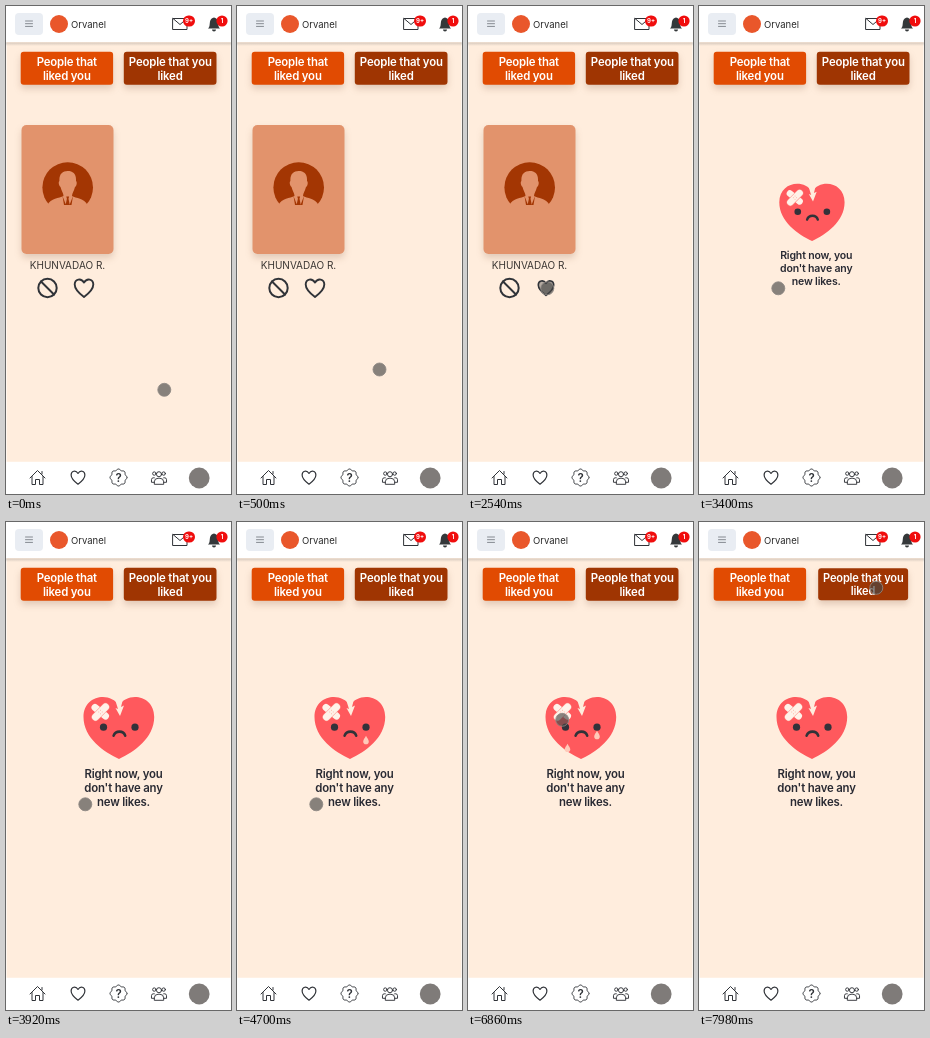
An HTML page for the animation above (8 s loop, 225 by 488 pixels).

```html
<!DOCTYPE html>
<html lang="en">
<head>
<meta charset="utf-8">
<title>Likes</title>
<style>
  html, body { margin: 0; width: 100%; height: 100%; overflow: hidden; background: #fff; }
  svg { display: block; width: 100%; height: 100%; }
  text { font-family: Inter, Roboto, sans-serif; text-anchor: middle; }
  .label, .message { font-size: 11.4px; font-weight: 600; letter-spacing: -.17px; fill: #fff; }
  .message { fill: #292a33; }
  .badge { font-size: 6px; font-weight: 700; fill: #fff; }
  .icon { fill: none; stroke: #303338; stroke-linejoin: round; stroke-linecap: round; }
  .shadow { filter: drop-shadow(0 4px 3.5px rgba(90, 40, 10, .18)); }
</style>
</head>
<body>
<svg viewBox="0 0 225 488" preserveAspectRatio="none">
  <defs>
    <path id="heart" d="M0 9C-4 6-9.3 1.5-9.3-3.5C-9.3-9-3-10.5 0-5.5C3-10.5 9.3-9 9.3-3.5C9.3 1.5 4 6 0 9Z"/>
    <path id="tear" d="M0-4.4C1.2-2 2.8-.4 2.8 1.2A2.8 2.8 0 0 1-2.8 1.2C-2.8-.4-1.2-2 0-4.4Z" fill="#ffc9b9"/>
    <linearGradient id="edge" x2="0" y2="1">
      <stop stop-color="#8a8581" stop-opacity=".35"/>
      <stop offset="1" stop-color="#8a8581" stop-opacity="0"/>
    </linearGradient>
    <clipPath id="portrait"><path d="M36 155H88V199H36Z"/></clipPath>
  </defs>

  <rect x=".5" y="36" width="224" height="420" fill="#ffeddd"/>
  <rect y="36.5" width="225" height="3.5" fill="url(#edge)"/>

  <!-- Header -->
  <rect x="9" y="7" width="28" height="22" rx="4" fill="#e9edf3"/>
  <path class="icon" d="M19.5 15h7M19.5 17.7h7M19.5 20.4h7" style="stroke:#858a91"/>
  <circle cx="53" cy="18" r="9" fill="#e9572b"/>
  <text x="82.5" y="21.5" font-size="9.5" fill="#2b2b2b">Orvanel</text>
  <path class="icon" d="M167 12.5h14v11h-14zl7 6 7-6"/>
  <rect x="177" y="9.5" width="12" height="11" rx="5.5" fill="#f00d0d"/>
  <text class="badge" x="183" y="17.2">9+</text>
  <path d="M202 22.5C204 21 203.5 18 204 15.5C204.5 13 206 12.2 208 11.5C210 12.2 211.5 13 212 15.5C212.5 18 212 21 214 22.5ZM206 23.5h4a2 2 0 0 1-4 0Z" fill="#34383a"/>
  <circle cx="216" cy="15" r="5.6" fill="#f00d0d"/>
  <text class="badge" x="216" y="17.2">1</text>

  <!-- Tabs -->
  <g class="shadow">
    <rect x="14.7" y="45.7" width="92.4" height="33" rx="3" fill="#e14b02"/>
    <text class="label" x="60.8" y="59.5">People that</text>
    <text class="label" x="60.8" y="73.5">liked you</text>
  </g>
  <g id="secondTab" class="shadow">
    <rect x="117.8" y="45.7" width="92.7" height="33" rx="3" fill="#9f3502"/>
    <text class="label" x="164.3" y="59.5">People that you</text>
    <text class="label" x="164" y="73.5">liked</text>
  </g>

  <!-- Profile card -->
  <g id="card">
    <rect class="shadow" x="15.5" y="119" width="92" height="129" rx="5" fill="#e2936c"/>
    <g clip-path="url(#portrait)">
      <circle cx="61.7" cy="181.5" r="25.3" fill="#a33603"/>
      <path d="M61.7 165C67 165 70.5 168 70 175C71.5 176 70.5 180 69 181C68 185 66 187.5 66 190C70 192.5 79 192 82 200H41C44 192 53 192.5 57.5 190C57.5 187.5 55.5 185 54.5 181C53 180 52 176 53.4 175C53 168 56.5 165 61.7 165Z" fill="#e2936c"/>
      <path d="M56.5 190L60 199H58ZM67 190L63.5 199H65.5ZM60.3 190.5h2.8l-.6 2.3 1.3 6.2h-4.2l1.3-6.2Z" fill="#a33603"/>
    </g>
    <text x="61.5" y="263" font-size="10" fill="#3a3532">KHUNVADAO R.</text>
    <g class="icon" stroke-width="2">
      <circle cx="41.5" cy="282" r="9.2"/>
      <path d="M35 275.5L48 288.5"/>
    </g>
    <g id="like" class="icon" stroke-width="1.9"><use href="#heart"/></g>
  </g>

  <!-- Empty state -->
  <g id="empty">
    <path d="M113 237C98 230 77.5 216 77.5 195C77.5 173 104 169 113 183.5C122 169 148.2 173 148.2 195C148.2 216 128 230 113 237Z" fill="#ff595d"/>
    <path d="M109.5 179L112 187L109.5 186L114 194L118 183.5L115 185L116.5 179Z" fill="#ffeddd"/>
    <g fill="none" stroke-width="7" stroke-linecap="round" stroke="#fff2e9">
      <path d="M89 185.5L99.5 194"/>
      <path d="M99.5 185L89.5 195" stroke="#ff8b83" stroke-width="8"/>
      <path d="M99.5 185L89.5 195"/>
    </g>
    <path d="M92.7 190h.1M96.2 190h.1M94.5 188.3h.1M94.5 191.8h.1" class="icon" style="stroke:#ffb4a4"/>
    <g fill="#33323a">
      <circle cx="97.5" cy="205.2" r="3.6"/>
      <circle cx="129" cy="205.2" r="3.6"/>
    </g>
    <path class="icon" stroke-width="2.6" d="M107.6 213.7C109.5 208.2 117.5 208.2 119.2 213.7"/>
    <use id="leftTear" href="#tear"/>
    <use id="rightTear" href="#tear"/>
    <text class="message" x="117.5" y="256.2">Right now, you</text>
    <text class="message" x="117.5" y="270.2">don't have any</text>
    <text class="message" x="117.5" y="284.2">new likes.</text>
  </g>

  <!-- Bottom navigation -->
  <rect y="455.8" width="225" height="32.2" fill="#fff"/>
  <g class="icon" stroke-width="1">
    <path d="M24 472L31.5 464.5L39 472M26 470.5V478.5H29.5V473.5H33.5V478.5H37V470.5M36 468V465.5"/>
    <use href="#heart" transform="translate(72 471.5) scale(.74)" stroke-width="1.6"/>
    <path id="seal"/>
    <g transform="translate(153 471.8) scale(.94)">
      <circle cy="-3.8" r="2.7"/>
      <path d="M-5 6.5v-2.2a4 4 0 0 1 4-3.8h2a4 4 0 0 1 4 3.8v2.2Z"/>
      <circle cx="-5" cy="-4.5" r="1.8"/>
      <circle cx="5" cy="-4.5" r="1.8"/>
      <path d="M-5 0h-1.2a2 2 0 0 0-1.8 2v2.8h3M5 0h1.2a2 2 0 0 1 1.8 2v2.8h-3"/>
    </g>
  </g>
  <text x="112.5" y="475.6" font-size="11.5" font-weight="600" fill="#303338">?</text>
  <circle cx="193.2" cy="472" r="10.4" fill="#7f7b79"/>

  <circle id="pointer" r="6.5" fill="#464646" fill-opacity=".65" stroke="#8f8984" stroke-opacity=".85"/>
</svg>
<script>
  const LOOP = 8000, TEAR_PERIOD = 2300, TEAR_FALL = 700, EMPTY_START = 3140;
  const el = id => document.getElementById(id);
  const progress = (t, start, end) => Math.min(1, Math.max(0, (t - start) / (end - start)));
  const smooth = u => u * u * (3 - 2 * u);
  const move = (id, x, y) => el(id).setAttribute('transform', `translate(${x} ${y})`);
  const scaleAt = (id, x, y, s) =>
    el(id).setAttribute('transform', `translate(${x} ${y}) scale(${s}) translate(${-x} ${-y})`);
  const fade = (id, opacity) => el(id).setAttribute('opacity', opacity);

  const sealPoints = Array.from({ length: 96 }, (_, i) => {
    const a = i / 96 * 2 * Math.PI, r = 7.9 + .6 * Math.cos(8 * a);
    return `${(112.5 + r * Math.cos(a)).toFixed(2)} ${(471.5 + r * Math.sin(a)).toFixed(2)}`;
  });
  el('seal').setAttribute('d', `M${sealPoints.join('L')}Z`);

  function pointerPosition(t) {
    if (t < 6520) {
      const u = smooth(progress(t, 300, 1000));
      return [158.3 - 79 * u, 383.8 - 101.5 * u];
    }
    const u = smooth(progress(t, 6520, 7320));
    const curve = (a, b, c) => (1 - u) ** 2 * a + 2 * u * (1 - u) * b + u * u * c;
    return [curve(79.3, 79.3, 177.3), curve(282.3, 174, 65.8)];
  }

  function drawTear(id, x, t, start) {
    const age = (t - start + 4 * TEAR_PERIOD) % TEAR_PERIOD;
    const u = age / TEAR_FALL;
    move(id, x, 206 + 25 * u);
    fade(id, u > 1 ? 0 : Math.min(1, u * 6, (1 - u) * 6));
  }

  function render(t) {
    move('pointer', ...pointerPosition(t));

    const press = progress(t, 2430, 2520) * (1 - progress(t, 2640, 2740));
    el('like').setAttribute('transform', `translate(78 282) scale(${1 - .17 * press})`);
    el('like').style.fill = `rgba(90, 90, 90, ${.45 * press})`;
    fade('card', 1 - progress(t, 2900, 3100));

    const enter = progress(t, EMPTY_START, EMPTY_START + 500);
    scaleAt('empty', 114, 212, 1 - .7 * (1 - enter) ** 3);
    fade('empty', Math.min(1, enter * 2));
    drawTear('leftTear', 99.5, t, 4000);
    drawTear('rightTear', 129, t, 4360);

    scaleAt('secondTab', 164.3, 62.5, 1 - .03 * progress(t, 7860, 7960));
  }

  function tick() {
    render(performance.now() % LOOP);
    requestAnimationFrame(tick);
  }
  tick();
</script>
</body>
</html>
```
